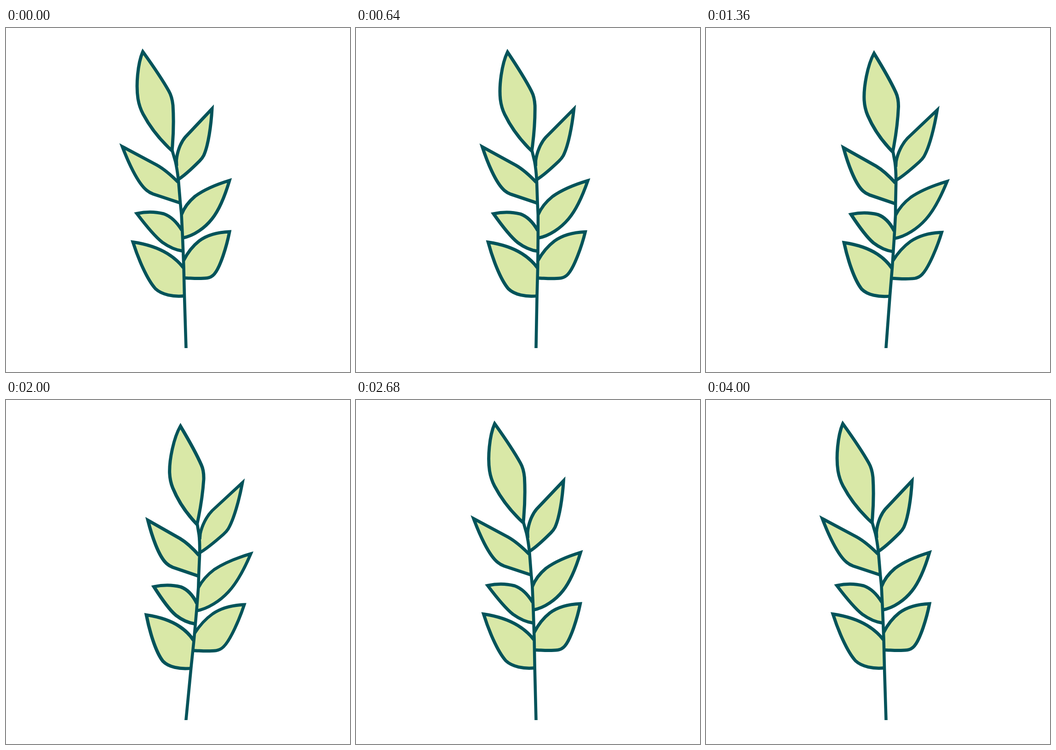
An HTML page that plays this animation: 748 px wide and 748 px high, repeating every 4040 ms.

```html
<!DOCTYPE html>
<html lang="en">
<head>
<meta charset="utf-8">
<title>Swaying sprig</title>
<style>
  html, body { margin: 0; width: 100%; height: 100%; overflow: hidden; background: #fff; }
  svg { display: block; width: 100vw; height: 100vh; }
  #sprig {
    fill: #d9e8a7;
    stroke: #03535a;
    stroke-width: 7;
    stroke-linejoin: miter;
    stroke-miterlimit: 10;
  }
  #stem { fill: none; stroke-width: 6.6; }
</style>
</head>
<body>
<svg viewBox="0 0 748 748">
  <g id="sprig">
    <!-- each leaf runs from the stem to its tip and back -->
    <path d="M361 267C364 235 365 200 363 168Q361 149 354 137C340 112 318 80 297.500 51.500C286 78 282.500 125 287 154Q290 172 298 187C314 217 338 246 361 267"/>
    <path d="M371 300L370.500 288C372 270 379 250 390 237L448 175.500C446 212 440 255 430 277Q427 283 421 289C407 303 391 319 375 329"/>
    <path d="M374 335C359 320 344 307 328 298L253 258C265 290 286 337 306 353Q312 358 320 361L379 380.500"/>
    <path d="M381.500 406C388 389 399 376 411 366C430 352 458 340 486 331.500C477 362 464 395 448 415C433 434 409 452 384 456.500"/>
    <path d="M382.500 440C372 423 360 410 343 404C325 399.500 305 399 284.500 403.500C300 424 322 452 340 466C354 476 369 483 384.500 485"/>
    <path d="M386 506C394 490 406 474 420 463C436 451 460 444 486 443C480 474 466 520 453 535Q447 542 438 543.500C420 546 405 544 387.500 543.500"/>
    <path d="M386 521.500C377 510 365 499 351 490.500C329 477 300 469 276 465.500C287 500 306 546 325 567C339 580 364 585 388 582.500"/>
    <path id="stem" d="M391.500 696L388 583L386.500 520L384 456L381.500 405L379 380L375 332Q372 305 368 289L361 265"/>
  </g>
</svg>
<script>
  const LOOP = 4040, STEP = 40;
  const BASE = { x: 391.5, y: 695 };
  const RIGHT = 7.3, LEFT = -1.85; // lean in degrees
  const sprig = document.getElementById('sprig');

  const smooth = u => u * u * (3 - 2 * u);
  const settle = u => u + u * u - u * u * u; // steady start, soft stop

  function lean(t) {
    if (t < 2000) return RIGHT * settle(t / 2000);
    if (t < 3000) return RIGHT + (LEFT - RIGHT) * smooth((t - 2000) / 1000);
    return LEFT * (1 - smooth(Math.min(1, (t - 3000) / 1000)));
  }

  function draw(now) {
    const t = Math.floor((now % LOOP) / STEP) * STEP;
    const a = lean(t) * Math.PI / 180;
    const s = Math.sin(a), c = Math.cos(a);
    // tilt the vertical axis about the foot; horizontals stay level
    sprig.setAttribute('transform',
      `matrix(1 0 ${-s} ${c} ${s * BASE.y} ${BASE.y * (1 - c)})`);
  }

  let start;
  function tick(now) {
    start ??= now;
    draw(now - start);
    requestAnimationFrame(tick);
  }
  draw(0);
  requestAnimationFrame(tick);
</script>
</body>
</html>
```
